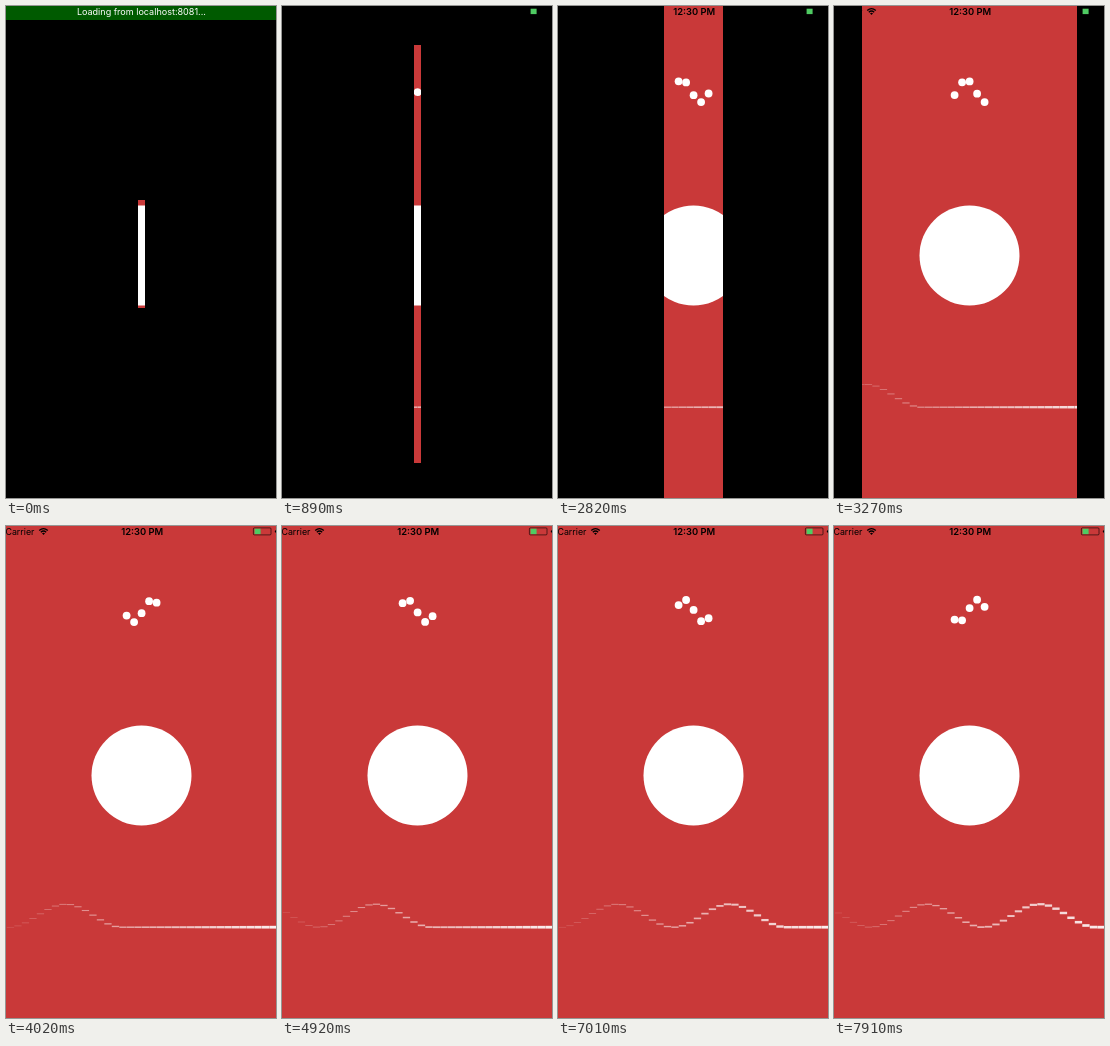
These frames come from a looping animation (270x492 px, 8 s). An HTML page:

```html
<!DOCTYPE html>
<html lang="en">
<head>
<meta charset="utf-8">
<title>Splash reveal</title>
<style>
  html, body { margin: 0; width: 100%; height: 100%; overflow: hidden; background: #000; }
  svg { display: block; width: 270px; height: 492px; }
  text { font-family: Inter, "Liberation Sans", sans-serif; }
</style>
</head>
<body>
<svg viewBox="0 0 270 492">
  <defs>
    <clipPath id="window"><rect id="hole"/></clipPath>
  </defs>
  <g clip-path="url(#window)">
    <rect width="270" height="492" fill="#c93939"/>
    <circle cx="135.5" cy="249.5" r="50" fill="#fff"/>
    <g id="dots" fill="#fff"></g>
    <g id="bars" fill="#fff"></g>
  </g>
  <g id="status">
    <text x="-0.6" y="8.8" font-size="8.9">Carrier</text>
    <g fill="none" stroke="#000" stroke-width="1.3">
      <path d="M33.2 4.5Q37.5 .8 41.8 4.5"/>
      <path d="M34.8 6.2Q37.5 3.8 40.2 6.2"/>
    </g>
    <path d="M36 7.3Q37.5 6.1 39 7.3L37.5 8.9Z"/>
    <text x="136.2" y="8.8" font-size="9.4" font-weight="600" text-anchor="middle">12:30 PM</text>
    <rect x="247.4" y="1.9" width="17.6" height="7" rx="1" fill="none" stroke="#000" stroke-width=".6"/>
    <rect x="248.6" y="2.7" width="6" height="5.4" fill="#4fcb62"/>
    <path d="M270 4.2a1.2 1.2 0 0 0 0 2.4z"/>
  </g>
  <g id="loading">
    <rect width="270" height="14" fill="#005a00"/>
    <text x="135.4" y="9.4" font-size="9.05" fill="#fff" text-anchor="middle">Loading from localhost:8081...</text>
  </g>
</svg>
<script>
const LOOP = 8000, TAU = Math.PI * 2;
const $ = id => document.getElementById(id);
const set = (el, attrs) => { for (const k in attrs) el.setAttribute(k, attrs[k]); };
const add = (parent, tag, attrs) => {
  const el = document.createElementNS(parent.namespaceURI, tag);
  set(el, attrs);
  return parent.appendChild(el);
};

const dots = Array.from({ length: 5 }, (_, i) =>
  add($('dots'), 'circle', { cx: 120.6 + 7.5 * i, r: 3.9 }));

// Bars grow thicker and more opaque to the right.
const bars = Array.from({ length: 36 }, (_, i) => {
  const height = 0.4 + 0.068 * i;
  return { mid: 4.5 + 7.5 * i, height, el: add($('bars'), 'rect',
    { x: 0.8 + 7.5 * i, width: 7.3, height, opacity: 0.25 + 0.019 * i }) };
});

// Pictures are held for 150 ms, a few for 140 ms.
const SHORT = [5, 8, 11, 34];
const starts = [0];
for (let n = 0; n < 53; n++) starts.push(starts[n] + (SHORT.includes(n) ? 140 : 150));
const hold = t => starts.findLast(s => s <= t);

// Half height of the opening: grows, overshoots, settles.
const HEIGHT = [[0, 54], [1190, 236], [1480, 256], [2070, 238], [2370, 250]];
function along(steps, t) {
  const n = steps.findIndex(s => s[0] > t);
  if (n < 0) return steps.at(-1)[1];
  const [t0, a] = steps[n - 1], [t1, b] = steps[n];
  return a + (b - a) * (1 - Math.cos(Math.PI * (t - t0) / (t1 - t0))) / 2;
}

function draw(t) {
  const h = along(HEIGHT, t);
  const w = 3.5 + 104 * (Math.max(0, t - 2370) / 900) ** 2;
  set($('hole'), { x: 135.5 - w, y: 248 - h, width: 2 * w, height: 2 * h });

  const fade = Math.min(1, Math.max(0, (850 - t) / 250));
  set($('loading'), { opacity: fade });

  const phase = 0.716 + (t - 2070) * 0.0004955;
  dots.forEach((dot, i) => set(dot, { cy: 84.9 - 11.2 * Math.cos(TAU * (i / 5 - phase)) }));

  const front = 116 + (t - 4020) * 0.0375;
  for (const { el, mid, height } of bars) {
    const lift = 11.5 * (1 - Math.cos(TAU * Math.max(0, front - mid) / 112.5));
    set(el, { y: 401.2 - lift - height / 2 });
  }
}

const begin = performance.now();
function tick() {
  draw(hold((performance.now() - begin) % LOOP));
  requestAnimationFrame(tick);
}
tick();
</script>
</body>
</html>
```
